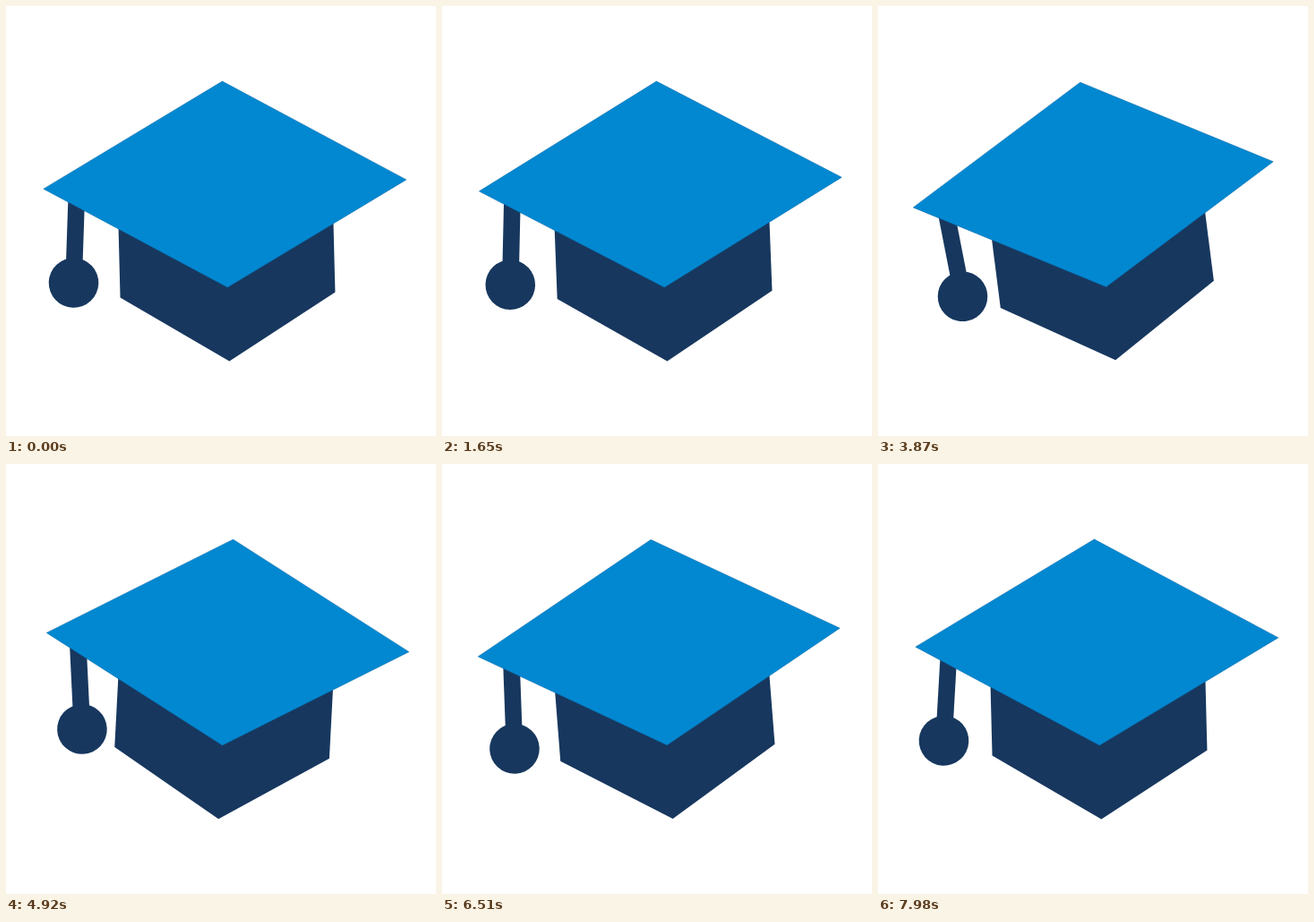
An HTML page with a canvas for the animation above (8 s loop, 480 by 480 pixels).

```html
<!DOCTYPE html>
<html lang="en">
<head>
<meta charset="utf-8">
<title>Graduation cap</title>
<style>
  html, body { margin: 0; width: 100%; height: 100%; overflow: hidden; background: #fff; }
  canvas { display: block; width: 480px; height: 480px; }
</style>
</head>
<body>
<canvas id="stage" width="480" height="480"></canvas>
<script>
const ctx = document.getElementById('stage').getContext('2d');
const LOOP = 8000, STEP = 30;
const BLUE = '#0288d1', EDGE = '#0a70b0', NAVY = '#17375e';
const PIVOT = [245.4, 240];
const HINGE = [-166.3, -24.2];

// [time in ms, clockwise degrees]
const CAP_TILT = [
  [0, -1.45], [170, -7.4], [520, 5.6], [780, 1.5], [1250, -7.5], [1900, 0.4],
  [2500, -7.7], [2550, -7.5], [3240, 0.4], [3440, 5.6], [3820, -7.5],
  [3870, -7.25], [4050, -3.6], [4560, 5.8], [4920, 3], [5300, -6],
  [5670, 5.2], [5850, 8.8], [6510, -4.5], [6620, -7.4], [7300, 5.6], [7980, -1.45]
];
const TASSEL_SWING = [
  [0, 3.4], [150, 4], [780, -6.15], [1350, 2], [1900, 4], [2550, -3.8],
  [3440, 5.3], [3870, -3.85], [4300, 1], [4920, -5.8], [5670, 4.9],
  [5850, 3.7], [6510, 2.4], [7300, 0], [7980, 4.7]
];

// Slope at a key: flat at extremes, harmonic mean of neighbours elsewhere
function slope(keys, i) {
  if (i === 0 || i === keys.length - 1) {
    const [p, q] = i === 0 ? [keys[0], keys[1]] : [keys[i - 1], keys[i]];
    return (q[1] - p[1]) / (q[0] - p[0]);
  }
  const before = (keys[i][1] - keys[i - 1][1]) / (keys[i][0] - keys[i - 1][0]);
  const after = (keys[i + 1][1] - keys[i][1]) / (keys[i + 1][0] - keys[i][0]);
  return before * after <= 0 ? 0 : 2 * before * after / (before + after);
}

// Smooth curve through the keys without overshoot
function sample(keys, t) {
  let i = 0;
  while (i < keys.length - 2 && t >= keys[i + 1][0]) i++;
  const [t0, v0] = keys[i], [t1, v1] = keys[i + 1];
  const span = t1 - t0;
  const u = Math.min(1, (t - t0) / span);
  const ease = u * u * (3 - 2 * u);
  return v0 + (v1 - v0) * ease
    + span * u * (1 - u) * ((1 - u) * slope(keys, i) - u * slope(keys, i + 1));
}

const rad = deg => deg * Math.PI / 180;

function polygon(points, fill) {
  ctx.beginPath();
  points.forEach(([x, y]) => ctx.lineTo(x, y));
  ctx.closePath();
  ctx.fillStyle = fill;
  ctx.fill();
}

function drawTassel(angle) {
  ctx.save();
  ctx.translate(...HINGE);
  ctx.rotate(rad(angle));
  ctx.fillStyle = NAVY;
  ctx.fillRect(-9.3, -10, 18.6, 90);
  ctx.beginPath();
  ctx.arc(0, 89, 27.8, 0, Math.PI * 2);
  ctx.fill();
  ctx.restore();
}

function draw(t) {
  ctx.fillStyle = '#fff';
  ctx.fillRect(0, 0, 480, 480);
  ctx.save();
  ctx.translate(...PIVOT);
  ctx.rotate(rad(sample(CAP_TILT, t)));
  drawTassel(sample(TASSEL_SWING, t));
  polygon([[-120, -20], [120, -20], [120, 82.5], [0, 156.5], [-120, 82.5]], NAVY);
  polygon([[0, -156], [202.5, -41], [0, 74], [-202.5, -41]], BLUE);
  ctx.strokeStyle = EDGE;
  ctx.lineWidth = 0.6;
  ctx.stroke();
  ctx.restore();
}

const start = performance.now();
function tick() {
  const t = (performance.now() - start) % LOOP;
  draw(Math.floor(t / STEP) * STEP);
  requestAnimationFrame(tick);
}
tick();
</script>
</body>
</html>
```
